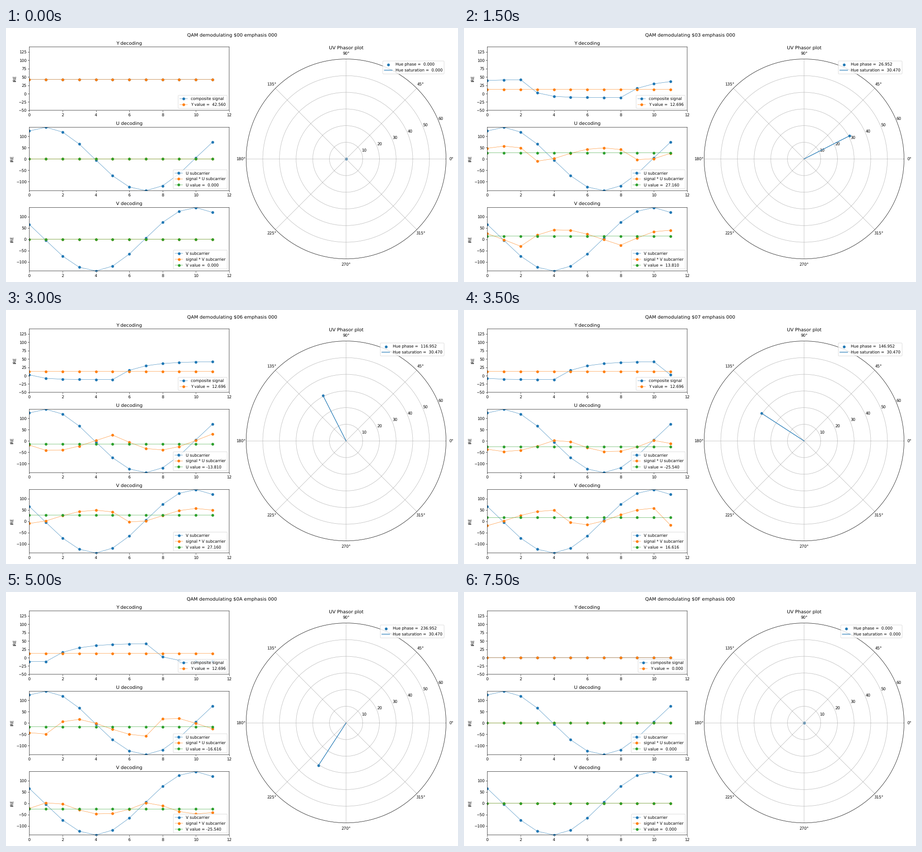
A matplotlib script that plays this animation: 998 px wide and 561 px high, repeating every 8 s.

```python
import numpy as np
import matplotlib.pyplot as plt
from matplotlib.animation import FuncAnimation

W, H = 998, 561
DPI = W / 16

# Signal levels in IRE, and how much of a step is left after each sample
HIGH, LOW = 42.56, -11.76
RISE, FALL = 0.4902, 0.2623
LUMA, SAT, HUE = 12.696, 30.4697, 296.952
BURST = 62.08

t = np.arange(12)
angle = np.radians(30 * t + BURST)
carriers = {"U": np.sin(angle), "V": np.cos(angle)}
FLAT = {0x0: HIGH, 0xD: LOW, 0xE: 0.0, 0xF: 0.0}


def decode(hue):
    """Return composite samples, luma, saturation and phase in degrees."""
    if hue in FLAT:
        return np.full(12, FLAT[hue]), FLAT[hue], 0.0, 0.0
    k = (t + hue) % 12
    step = HIGH - LOW
    up = HIGH - step * RISE ** (k + 1.0)
    down = LOW + step * (1 - RISE ** 6) * FALL ** (k - 5.0)
    return np.where(k < 6, up, down), LUMA, SAT, (HUE + 30 * hue) % 360


# Soft subpixel lines and glyphs
plt.rcParams.update({"font.family": "DejaVu Sans", "path.snap": False,
                     "text.hinting": "none"})
fig = plt.figure(figsize=(W / DPI, H / DPI), dpi=DPI)
grid = fig.add_gridspec(3, 2, left=51.46 / W, right=971.6 / W,
                        top=1 - 41.8 / H, bottom=1 - 536.6 / H,
                        wspace=37.4 / 441.4, hspace=37.4 / 140)
heading = fig.suptitle("")


def panel(row, name, ylim, yticks, labels):
    ax = fig.add_subplot(grid[row, 0])
    ax.set_title(f"{name} decoding")
    ax.set_ylabel("IRE")
    ax.set(xlim=(0, 12), ylim=ylim, xticks=range(0, 13, 2), yticks=yticks)
    lines = [ax.plot(t, 0 * t, "o-", linewidth=0.7, label=s)[0] for s in labels]
    return lines, ax.legend(loc="lower right").get_texts()[-1]


luma_lines, luma_text = panel(0, "Y", (-50, 140), range(-50, 126, 25),
                              ["composite signal", "Y value"])
chroma = {}
for row, name in enumerate("UV", 1):
    chroma[name] = panel(row, name, (-140, 140), range(-100, 101, 50),
                         [f"{name} subcarrier", f"signal * {name} subcarrier",
                          f"{name} value"])
    chroma[name][0][0].set_ydata(140 * carriers[name])

polar = fig.add_subplot(grid[:, 1], projection="polar")
polar.set_title("UV Phasor plot")
dot = polar.scatter([0], [0], label="Hue phase")
arm, = polar.plot([0, 0], [0, 0], label="Hue saturation")
polar.set_ylim(0, 60)
polar.set_yticks(range(10, 61, 10))
phase_text, sat_text = polar.legend(loc="upper right").get_texts()


def update(hue):
    signal, luma, sat, phase = decode(hue)
    heading.set_text(f"QAM demodulating ${hue:02X} emphasis 000")

    luma_lines[0].set_ydata(signal)
    luma_lines[1].set_ydata(np.full(12, luma))
    luma_text.set_text(f"Y value = {luma: .3f}")

    theta = np.radians(phase)
    values = {"U": sat * np.cos(theta), "V": sat * np.sin(theta)}
    for name, (lines, text) in chroma.items():
        lines[1].set_ydata(2 * (signal - luma) * carriers[name])
        lines[2].set_ydata(np.full(12, values[name]))
        text.set_text(f"{name} value = {values[name]: .3f}")

    dot.set_offsets([[theta, sat]])
    arm.set_data([theta, theta], [0, sat])
    phase_text.set_text(f"Hue phase = {phase: .3f}")
    sat_text.set_text(f"Hue saturation = {sat: .3f}")
    return []


anim = FuncAnimation(fig, update, frames=16, interval=500, repeat=True,
                     repeat_delay=0, blit=False)
plt.show()
```
